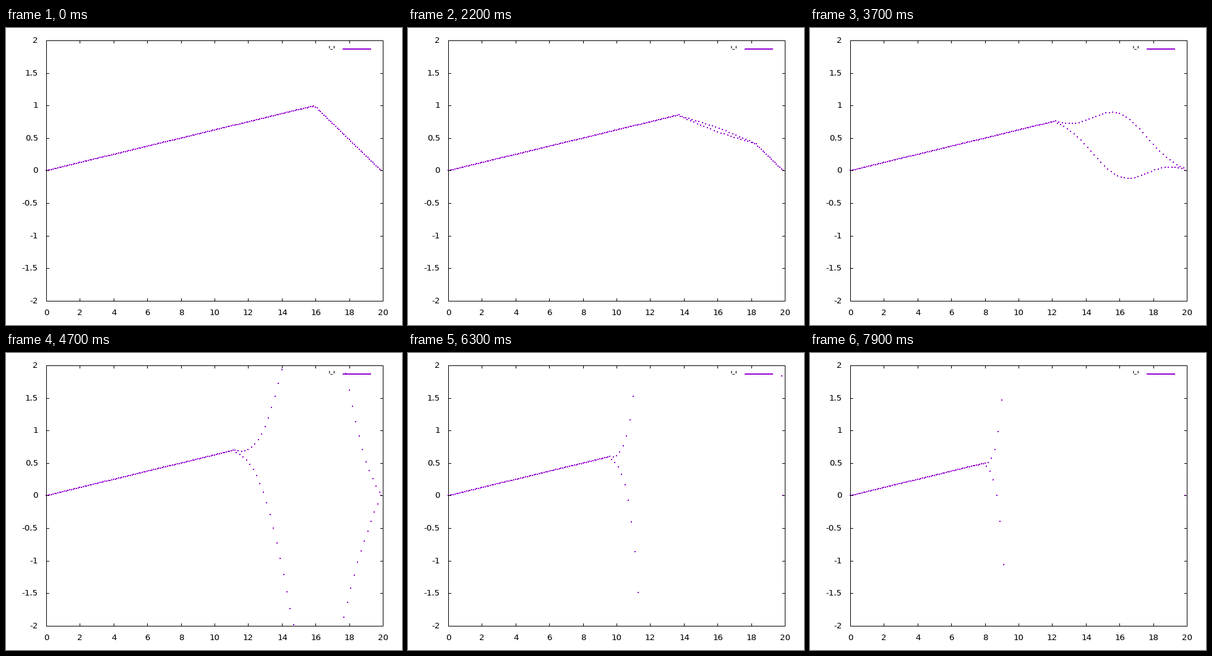
Write a matplotlib script that moves like this. It is 640 by 480 pixels and loops after 8000 ms.

```python
"""Plucked string: an explicit wave equation scheme just past its stability limit."""
import numpy as np
import matplotlib.pyplot as plt
from matplotlib.animation import FuncAnimation
from matplotlib.collections import PolyCollection
from matplotlib.patches import Rectangle

W, H, DPI = 640, 480, 100
LEFT, RIGHT, TOP, BOTTOM = 65, 609, 20, 441
FRAMES, INTERVAL = 80, 100
N = 200
COURANT2 = 1.01  # (c dt / dx)^2, slightly above 1, so the scheme blows up
VIOLET = "#9400d3"

plt.rcParams["font.family"] = "DejaVu Sans"
plt.rcParams["text.hinting"] = "native"


def px(x):
    return np.floor(LEFT + x * (RIGHT - LEFT) / 20 + 0.5).astype(int)


def py(y):
    up = H - 1 - BOTTOM + (y + 2) * (BOTTOM - TOP) / 4
    return H - 1 - np.floor(up + 0.5).astype(int)


def simulate():
    i = np.arange(N)
    old = np.where(i <= 160, i / 160, 5 * (1 - i / (N - 1)))

    def pull(y):
        force = np.zeros(N)
        force[1:-1] = COURANT2 * (y[2:] + y[:-2] - 2 * y[1:-1])
        return force

    now = old + pull(old) / 2
    states = []
    for _ in range(FRAMES):
        states.append(now)
        old, now = now, 2 * now - old + pull(now)
    return states


states = simulate()
xs = px(np.arange(N) * 0.1)

fig = plt.figure(figsize=(W / DPI, H / DPI), dpi=DPI, facecolor="white")
ax = fig.add_axes([0, 0, 1, 1])
ax.set_xlim(0, W)
ax.set_ylim(H, 0)
ax.axis("off")


def box(x, y, w, h, color="black", z=3):
    ax.add_patch(Rectangle((x, y), w, h, facecolor=color, linewidth=0, zorder=z))


def label(x, y, text, ha):
    ax.text(x, y, text, ha=ha, va="baseline", fontsize=9.6, color="black")


# Border
for y in (TOP, BOTTOM):
    box(LEFT, y, RIGHT - LEFT + 1, 1)
for x in (LEFT, RIGHT):
    box(x, TOP, 1, BOTTOM - TOP + 1)

# Ticks and labels
for v in range(0, 21, 2):
    x = px(v)
    box(x, TOP, 1, 5)
    box(x, BOTTOM - 4, 1, 5)
    label(x + 0.5, 464, str(v), "center")
for v in np.arange(-2, 2.5, 0.5):
    y = py(v)
    box(LEFT, y, 5, 1)
    box(RIGHT - 4, y, 5, 1)
    label(52, y + 4, f"{v:g}", "right")

# Key
label(532.5, 38, "'-'", "right")
box(544, 33, 46, 2, VIOLET, 2)

dots = PolyCollection([], facecolors=VIOLET, linewidths=0, zorder=2)
ax.add_collection(dots, autolim=False)
corners = np.array([(-1, -1), (1, -1), (1, 1), (-1, 1)])


def draw(frame):
    y = states[frame]
    seen = np.abs(y) <= 2
    centres = np.column_stack([xs[seen], py(y[seen])])
    dots.set_verts(centres[:, None, :] + corners)
    return [dots]


anim = FuncAnimation(fig, draw, frames=FRAMES, interval=INTERVAL,
                     repeat=True, repeat_delay=0)
plt.show()
```
